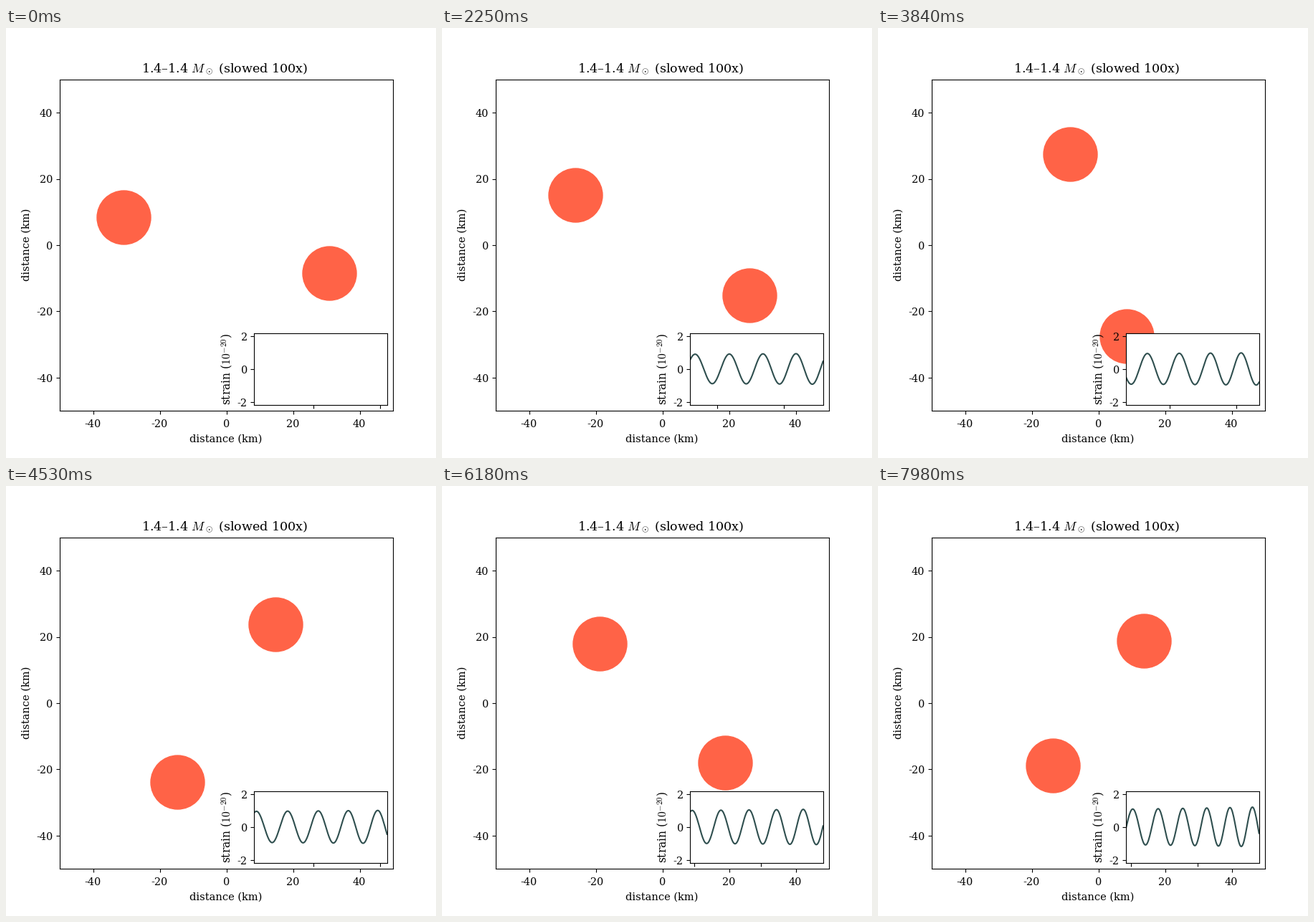
These frames come from a looping animation (600x600 px, 8 s). A matplotlib script:

```python
import numpy as np
import matplotlib.pyplot as plt
from matplotlib.animation import FuncAnimation

SIZE = 600
FRAMES = 267
LOOP_MS = 8000

# Inspiral: radius ~ (1-u)^(1/4), phase ~ 1-(1-u)^(5/8), u = n / MERGE
MERGE = 370.55            # steps until coalescence
R0 = 31.95                # km, initial orbit radius
PHASE0 = np.radians(-15.3)
TOTAL_PHASE = np.radians(6714.3)
STRAIN0 = 0.88

DT = 0.16573              # ms of simulated time per step
T0 = 0.505
WINDOW = 10.0

plt.rcParams.update({
    "font.family": "DejaVu Serif",
    "mathtext.fontset": "cm",
})


def orbit(n):
    left = 1 - n / MERGE
    radius = R0 * left ** 0.25
    phase = PHASE0 + TOTAL_PHASE * (1 - left ** 0.625)
    return radius, phase


def strain(n):
    radius, phase = orbit(n)
    return STRAIN0 * R0 / radius * np.cos(2 * phase)


fig = plt.figure(figsize=(6, 6), dpi=100, facecolor="white")


def label(x, y, s, size=10.4, ha="center", rotation=0):
    """Text with its baseline at pixel (x, y), y counted from the top."""
    fig.text(x / SIZE, 1 - y / SIZE, s, fontsize=size, ha=ha, va="baseline",
             rotation=rotation, rotation_mode="anchor")


def pixel_axes(x, bottom, w, h):
    return fig.add_axes([x / SIZE, bottom / SIZE, w / SIZE, h / SIZE])


ax = pixel_axes(75, 66, 465, 462)
ax.set_xlim(-50, 50)
ax.set_ylim(-50, 50)
ticks = range(-40, 41, 20)
ax.set_xticks(ticks, labels=[])
ax.set_yticks(ticks, labels=[])
for v in ticks:
    label(307.2 + 4.65 * v, 556.8, str(v))
    label(65.3, 308.9 - 4.62 * v, str(v), ha="right")

label(305, 61.3, r"1.4–1.4 $M_\odot$ (slowed 100x)", 12.6)
label(306.5, 577.3, "distance (km)", 10.5)
label(33, 302.5, "distance (km)", 10.5, rotation=90)

inset = pixel_axes(345.67, 74.33, 186, 100)
inset.set_ylim(-2.17, 2.17)
inset.set_xticks(range(0, 60, 5), labels=[])
inset.set_yticks([-2, 0, 2], labels=[])
for v in (-2, 0, 2):
    label(336.8, 481.8 - 23 * v, str(v), ha="right")
label(313.6, 475.5, "strain ($10^{-20}$)", 11.2, rotation=90)

stars, = ax.plot([], [], "o", color="tomato", ms=54)
wave, = inset.plot([], [], color="darkslategray", lw=1.5)


def update(n):
    radius, phase = orbit(n)
    x, y = radius * np.cos(phase), radius * np.sin(phase)
    stars.set_data([x, -x], [y, -y])

    steps = np.linspace(0, n, 4 * n + 1)
    wave.set_data(T0 + DT * steps, strain(steps))
    end = T0 + max(WINDOW, DT * n)
    inset.set_xlim(end - WINDOW, end)
    return stars, wave


def reset():
    return update(0)


ani = FuncAnimation(fig, update, frames=FRAMES, init_func=reset,
                    interval=LOOP_MS / FRAMES, repeat=True, repeat_delay=0,
                    blit=False)
plt.show()
```
